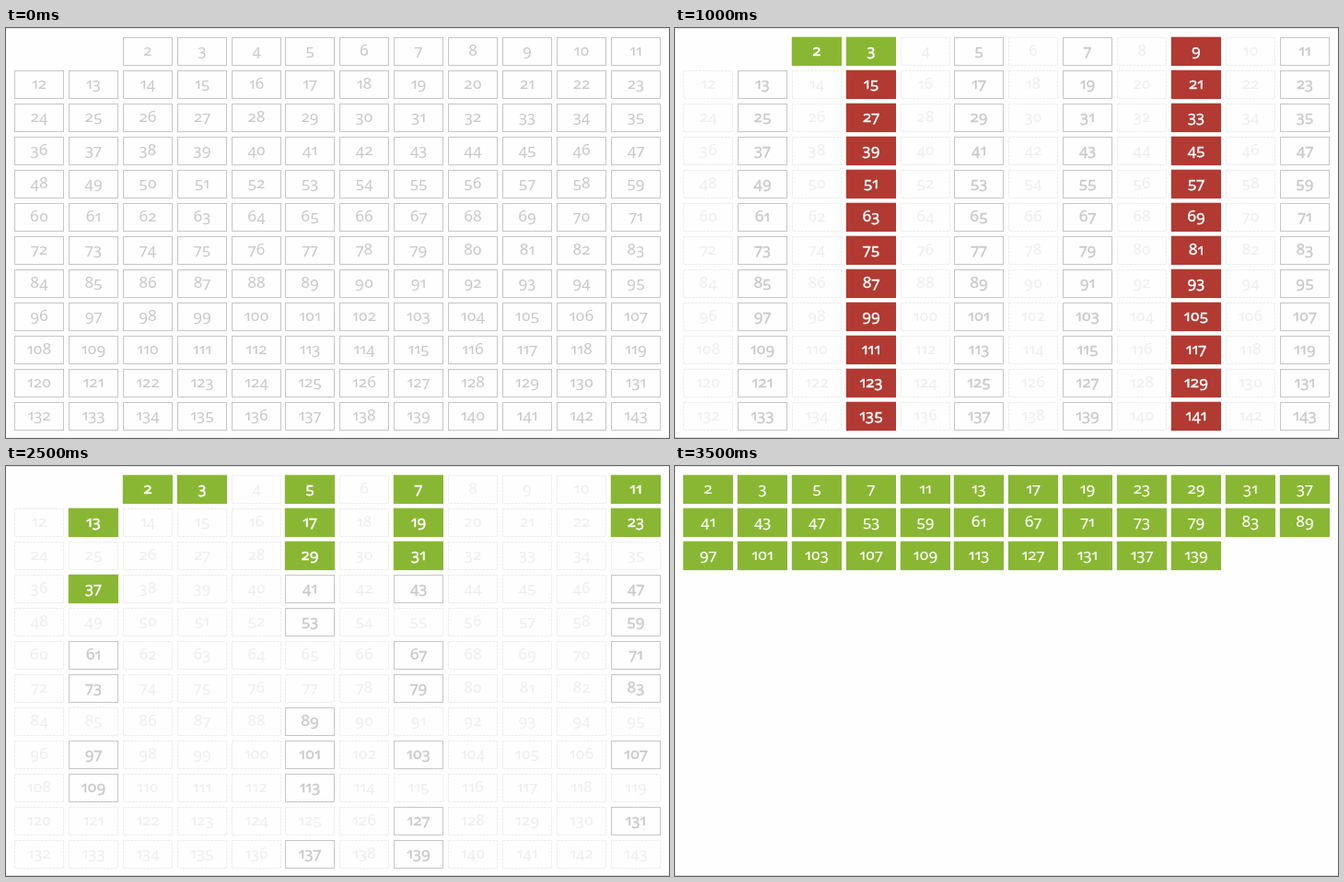
Write an HTML page that moves like this. It is 720 by 445 pixels and loops after 4000 ms.

```html
<!DOCTYPE html>
<html lang="en">
<head>
<meta charset="utf-8">
<title>Prime sieve</title>
<style>
html, body { margin: 0; width: 100%; height: 100%; overflow: hidden; background: #fefefe; }
svg { display: block; width: 720px; height: 445px; }
text {
  font: 400 17px "Noto Sans", "Open Sans", sans-serif;
  font-variant-numeric: oldstyle-nums proportional-nums;
  text-anchor: middle;
}
</style>
</head>
<body>
<svg id="stage" viewBox="0 0 720 445"></svg>
<script>
const NS = "http://www.w3.org/2000/svg";
const STEP = 500, STEPS = 8, COLS = 12, LAST = 143;
const SIEVE = [2, 3, 5, 7];
const GREEN = "#89b733", RED = "#b23a32";
const stage = document.getElementById("stage");

function add(parent, tag, attrs) {
  const el = document.createElementNS(NS, tag);
  set(el, attrs);
  parent.appendChild(el);
  return el;
}

function set(el, attrs) {
  for (const key in attrs) el.setAttribute(key, attrs[key]);
}

function leastFactor(n) {
  for (let d = 2; d * d <= n; d++) if (n % d === 0) return d;
  return n;
}

add(stage, "rect", { width: 720, height: 1, fill: "#e6e6e6" });
const floor = add(stage, "rect", { y: 444, width: 720, height: 1 });

const cells = [];
let primeCount = 0;
for (let n = 2; n <= LAST; n++) {
  const g = add(stage, "g", {});
  const box = add(g, "rect", {});
  const label = add(g, "text", { x: 27, y: 20 });
  label.textContent = n;
  const factor = leastFactor(n), prime = factor === n;
  cells.push({ n, g, box, label, factor, prime, rank: prime ? primeCount++ : -1 });
}

function stateOf({ n, factor, prime }, step) {
  if (step === 0) return "open";
  if (step <= SIEVE.length) {
    const p = SIEVE[step - 1];
    if (prime) return n <= p ? "prime" : "open";
    return factor < p ? "faded" : factor === p ? "hit" : "open";
  }
  if (!prime) return "faded";
  return step > 5 || n <= 37 ? "prime" : "open";
}

function paint(cell, step) {
  const { n, g, box, label, rank, prime } = cell;
  const packed = step === STEPS - 1;
  g.style.display = packed && !prime ? "none" : "";
  const slot = packed ? rank : n;
  const x = Math.round(8.9 + 58.9 * (slot % COLS));
  const y = 10 + 36 * Math.floor(slot / COLS);
  g.setAttribute("transform", `translate(${x} ${y})`);

  const state = stateOf(cell, step);
  if (state === "prime" || state === "hit") {
    set(box, { x: -0.2, y: -0.3, width: 54.2, height: 31.4, stroke: "none",
      fill: state === "hit" ? RED : GREEN });
    set(label, { fill: "#fff", stroke: "#fff",
      "stroke-width": step > 1 && !packed ? 0.4 : 0.15 });
    return;
  }
  const faded = state === "faded";
  const line = faded ? "#ececec" : step === 1 ? "#d6d6d6" : "#c6c6c6";
  const ink = faded ? "#eeeeee" : step === 1 ? "#d2d2d2" : "#c8c8c8";
  set(box, { x: 0.5, y: 0.5, width: 53, height: 30, fill: "none", stroke: line,
    "stroke-width": 1, "stroke-dasharray": faded ? "3 1" : "none" });
  set(label, { fill: ink, stroke: ink, "stroke-width": !faded && step > 1 ? 0.3 : 0 });
}

let shown = -1;
function render(time) {
  const step = Math.floor(time / STEP) % STEPS;
  if (step === shown) return;
  shown = step;
  floor.setAttribute("fill", step === 0 ? "#ececec" : "#d4d4d4");
  for (const cell of cells) paint(cell, step);
}

const start = performance.now();
function tick() {
  render(performance.now() - start);
  requestAnimationFrame(tick);
}
tick();
</script>
</body>
</html>
```
